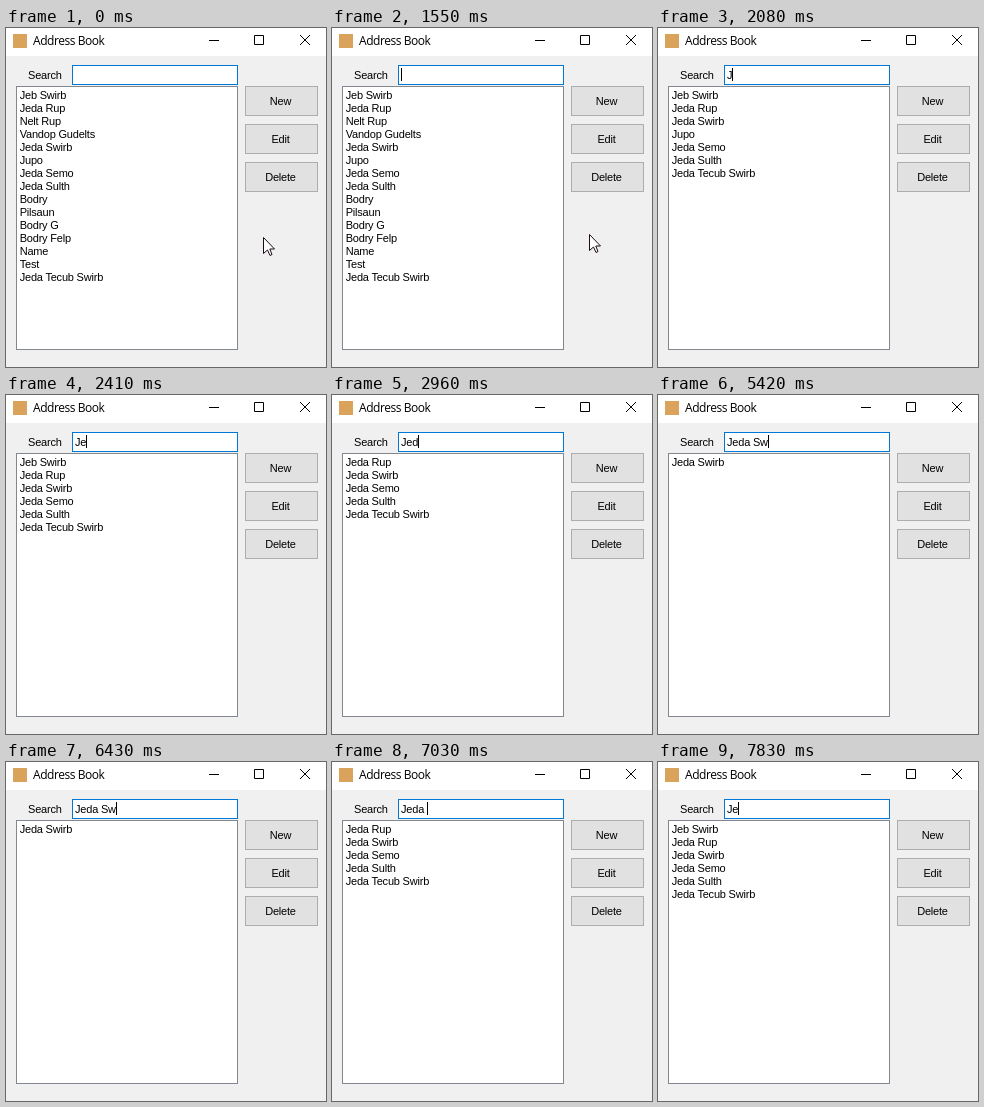
These frames come from a looping animation (320 by 339 pixels, 8000 ms). An HTML page:

```html
<!DOCTYPE html>
<html lang="en">
<head>
<meta charset="utf-8">
<title>Address Book</title>
<style>
  html, body { margin: 0; width: 100%; height: 100%; overflow: hidden; background: #f0f0f0; }
  svg { display: block; width: 320px; height: 339px; }
  text { font: 11px "Liberation Sans", Arial, sans-serif; letter-spacing: -.2px; white-space: pre; fill: #000; }
  .title { font: 12px "Open Sans", "Noto Sans", sans-serif; letter-spacing: -.45px; }
  .button rect { fill: #e1e1e1; stroke: #adadad; }
  .button text { text-anchor: middle; }
  .line { fill: none; stroke: #000; }
</style>
</head>
<body>
<svg viewBox="0 0 320 339">
  <rect width="320" height="339" fill="#f0f0f0"/>
  <rect width="320" height="28" fill="#fff"/>
  <rect x="7" y="6" width="14" height="14" fill="#d9a35c"/>
  <text class="title" x="27" y="17">Address Book</text>
  <path class="line" d="M203 12.5h10M248.5 7.5h9v9h-9z"/>
  <path class="line" d="M294 7l10 10M304 7l-10 10"/>

  <text x="22" y="51">Search</text>
  <rect x="66.5" y="37.5" width="165" height="19" fill="#fff" stroke="#0078d7"/>
  <text id="input" x="69" y="51"></text>
  <rect id="caret" x="69" y="40" width="1" height="13"/>

  <rect x="10.5" y="58.5" width="221" height="263" fill="#fff" stroke="#828790"/>
  <g id="list"></g>
  <g id="buttons"></g>

  <path id="pointer" d="M.5 .5V16.5L4.5 13L7 18.5L9 17.5L6.8 12H11.5Z"
        fill="#fff" stroke="#1c0a16"/>
</svg>
<script>
const LOOP = 8000;
const BLINK = 505;
const QUERY = "Jeda Sw";
const NAMES = [
  "Jeb Swirb", "Jeda Rup", "Nelt Rup", "Vandop Gudelts", "Jeda Swirb",
  "Jupo", "Jeda Semo", "Jeda Sulth", "Bodry", "Pilsaun", "Bodry G",
  "Bodry Felp", "Name", "Test", "Jeda Tecub Swirb"
];
// Key presses: the whole query is typed, then deleted again
const KEYS = [2080, 2410, 2960, 3490, 4420, 4820, 5420, 6830, 7030, 7360, 7560, 7760];
const FOCUS = -520;

const $ = id => document.getElementById(id);
const [input, caret, list, pointer] = ["input", "caret", "list", "pointer"].map($);

function add(parent, tag, attrs, text = "") {
  const el = document.createElementNS("http://www.w3.org/2000/svg", tag);
  for (const key in attrs) el.setAttribute(key, attrs[key]);
  el.textContent = text;
  return parent.appendChild(el);
}

function show(el, visible) {
  el.style.visibility = visible ? "visible" : "hidden";
}

["New", "Edit", "Delete"].forEach((label, i) => {
  const y = 58 + 38 * i;
  const g = add($("buttons"), "g", { class: "button" });
  add(g, "rect", { x: 239.5, y: y + .5, width: 72, height: 29 });
  add(g, "text", { x: 274.5, y: y + 19 }, label);
});

const rows = NAMES.map((_, i) => add(list, "text", { x: 13.7, y: 71 + 13 * i }));

let current = null;
function search(text) {
  if (text === current) return;
  current = text;
  input.textContent = text;
  caret.setAttribute("x", 69 + (text && Math.round(input.getComputedTextLength())));
  const found = NAMES.filter(name => name.startsWith(text));
  rows.forEach((row, i) => row.textContent = found[i] || "");
}

function draw() {
  const t = performance.now() % LOOP;
  const pressed = KEYS.filter(key => key <= t);
  const count = Math.min(pressed.length, 2 * QUERY.length - pressed.length);
  search(QUERY.slice(0, count));

  // Each key press restarts the blink with the caret on
  const idle = t - (pressed.pop() ?? FOCUS);
  show(caret, Math.floor(idle / BLINK) % 2 === 0);

  // The pointer drifts up, then hides while typing
  const drift = Math.min(3, Math.round(t / 180));
  pointer.setAttribute("transform", `translate(257 ${209 - drift})`);
  show(pointer, count === 0);
  requestAnimationFrame(draw);
}
draw();
</script>
</body>
</html>
```
